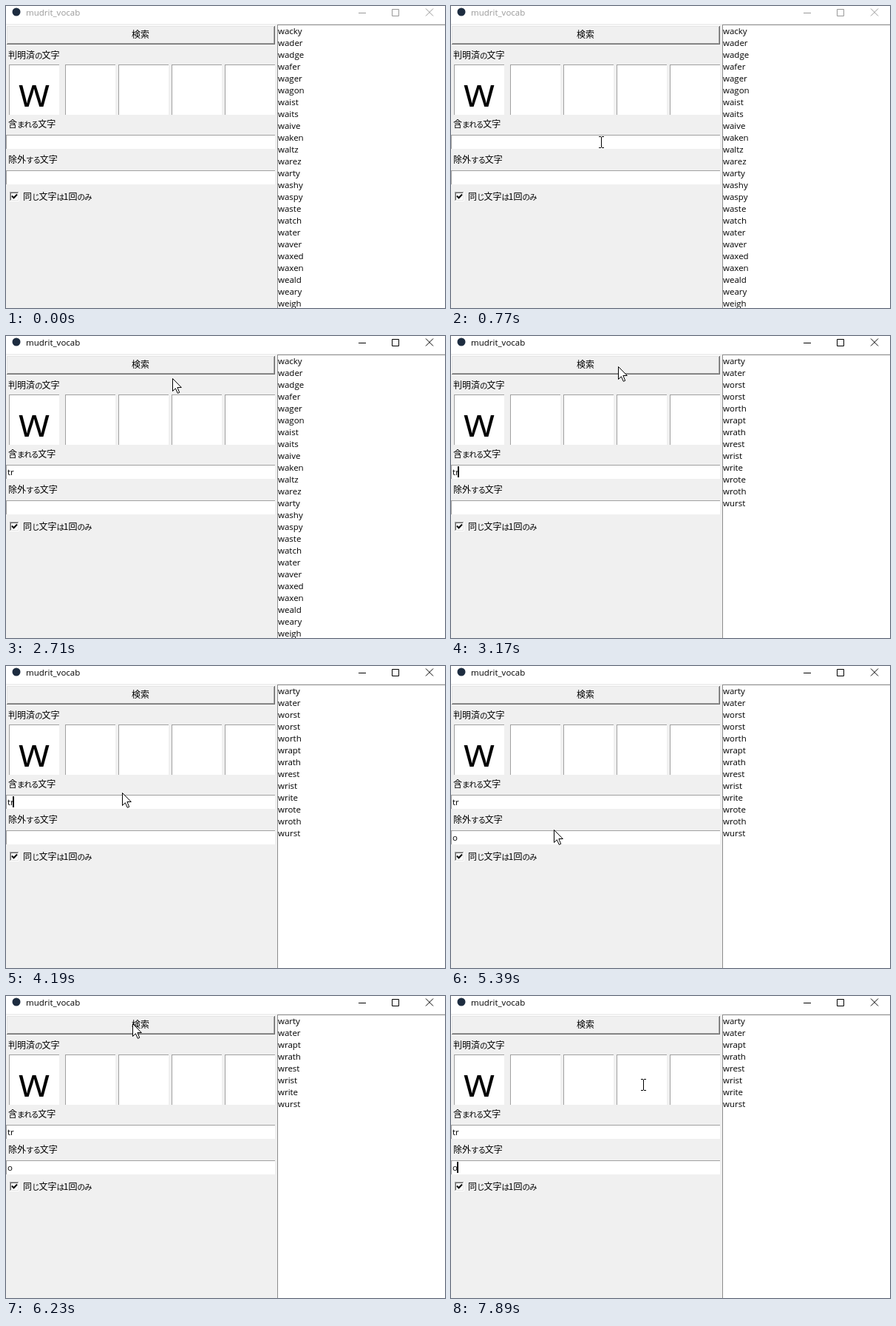
Animation of 594x408 px, one loop 7990 ms. Source, as an HTML page:

```html
<!DOCTYPE html>
<html lang="ja">
<head>
<meta charset="utf-8">
<style>
html, body { margin: 0; width: 100%; height: 100%; overflow: hidden; background: #f0f0f0; }
svg { display: block; }
rect { shape-rendering: crispEdges; }
text { font: 11.5px "Open Sans", "Noto Sans", sans-serif; }
.ja { font: 12px "Noto Sans CJK JP", "Noto Sans CJK", sans-serif; }
.kana { font-size: 10.6px; letter-spacing: -1.2px; }
</style>
</head>
<body>
<svg id="stage" width="594" height="408" viewBox="0 0 594 408"></svg>
<script>
const LOOP = 7990;
const stage = document.getElementById('stage');

function add(tag, attrs, text = '', parent = stage) {
  const el = document.createElementNS('http://www.w3.org/2000/svg', tag);
  for (const k in attrs) el.setAttribute(k, attrs[k]);
  el.textContent = text;
  return parent.appendChild(el);
}
const box = (x, y, width, height, fill) => add('rect', { x, y, width, height, fill });
const label = (x, y, text) => add('text', { x, y }, text);
const show = (el, on) => el.setAttribute('visibility', on ? 'visible' : 'hidden');

// Japanese text with narrower kana
function japanese(x, y, text) {
  const el = add('text', { x, y, class: 'ja' });
  for (const part of text.match(/[ぁ-ん]+|[^ぁ-ん]+/g))
    add('tspan', /[ぁ-ん]/.test(part) ? { class: 'kana' } : {}, part, el);
  return el;
}

function field(x, y, w, h) {
  box(x, y, w, h, '#a0a0a0');
  box(x + 1, y + 1, w - 1, h - 1, '#fff');
}

// Title bar
box(0, 0, 594, 24, '#fff');
add('circle', { cx: 14, cy: 8, r: 5.5, fill: '#1d2c40' });
const title = label(27, 13, 'mudrit_vocab');
const controls = add('path', { d: 'M477 9.5h10M522.5 4.5h9v9h-9zM568 3.5l10 10M578 3.5l-10 10', fill: 'none' });

// Search button
const edges = ['#fff', '#696969', '#e3e3e3', '#a0a0a0', '#f0f0f0'];
const bevel = [
  box(0, 26, 364, 26), box(1, 27, 363, 25), box(1, 27, 362, 24),
  box(2, 28, 361, 23), box(2, 28, 360, 22)
];
const search = japanese(170, 43, '検索');

// Left panel
japanese(3, 71, '判明済の文字');
for (let i = 0; i < 5; i++) field(i ? 8 + 72 * i : 4, 79, 68, 68);
add('text', { x: 38, y: 136, 'text-anchor': 'middle', style: 'font-size:54px' }, 'w');
japanese(3, 164, '含まれる文字');
field(0, 174, 364, 19);
japanese(3, 212, '除外する文字');
field(0, 222, 364, 19);
box(5, 251, 13, 13, '#fff');
box(5, 251, 12, 12, '#a0a0a0');
box(6, 252, 11, 11, '#e3e3e3');
box(6, 252, 10, 10, '#696969');
box(7, 253, 9, 9, '#fff');
add('path', { d: 'M8 256.5l2.5 2.8 4.5-4.8', fill: 'none', stroke: '#000', 'stroke-width': 2 });
japanese(23, 262, '同じ文字は1回のみ');
const included = label(2, 188, '');
const excluded = label(2, 236, '');
const caret = box(1, 176, 2, 15, '#000');

// Result list
box(367, 25, 227, 383, '#8c8c8c');
box(368, 26, 226, 382, '#fff');
const all = ('wacky wader wadge wafer wager wagon waist waits waive waken waltz warez ' +
  'warty washy waspy waste watch water waver waxed waxen weald weary weigh').split(' ');
const withTr = 'warty water worst worst worth wrapt wrath wrest wrist write wrote wroth wurst'.split(' ');
const withoutO = withTr.filter(w => !w.includes('o'));
const rows = all.map((w, i) => label(368, 38 + 16 * i, w));

// Pointer
const arrow = add('path', {
  d: 'M.5 .5V17.5L4.4 13.8 7.3 20.3 9.7 19.3 6.9 12.5H12.3Z', fill: '#fff', stroke: '#000'
});
const beam = add('path', { d: 'M-3-7.5h3m1 0h3M.5-7v14M-3 7.5h3m1 0h3', fill: 'none', stroke: '#000' });
const path = [
  [0, 123, 500], [209, 123, 500], [210, 123, 400], [560, 212, 222], [770, 203, 184],
  [1740, 203, 184], [1790, 205, 184], [2530, 205, 184], [2710, 225, 57], [2940, 226, 41],
  [3600, 226, 41], [3630, 225, 41], [4040, 225, 41], [4190, 157, 171], [4650, 136, 230],
  [5210, 136, 230], [5390, 139, 221], [5950, 171, 37], [7380, 171, 37], [7890, 260, 120]
];

function pointerAt(t) {
  let i = path.length - 1;
  while (path[i][0] > t) i--;
  const [t0, x0, y0] = path[i];
  const [t1, x1, y1] = path[i + 1] || [LOOP, x0, y0];
  const p = Math.floor((t - t0) / 46) * 46 / (t1 - t0);
  const e = Math.sin(p * Math.PI / 2);
  return [Math.round(x0 + (x1 - x0) * e), Math.round(y0 + (y1 - y0) * e)];
}

function overField(x, y) {
  if (x > 364) return false;
  if (y >= 79 && y < 147) return x >= 4 && (x - 8) % 72 < 68;
  return (y >= 174 && y < 193) || (y >= 222 && y < 241);
}

function draw(t) {
  const active = t >= 1130;
  title.setAttribute('fill', active ? '#000' : '#999');
  controls.setAttribute('stroke', active ? '#000' : '#999');

  const pressed = (t >= 2990 && t < 3170) || (t >= 6000 && t < 6230);
  const order = pressed ? [1, 0, 3, 2, 4] : [0, 1, 2, 3, 4];
  bevel.forEach((el, i) => el.setAttribute('fill', edges[order[i]]));
  search.setAttribute('transform', pressed ? 'translate(1 1)' : '');

  included.textContent = t < 1420 ? '' : t < 2380 ? 't' : 'tr';
  excluded.textContent = t < 5210 ? '' : 'o';
  const second = t >= 4700;
  const typed = second ? [1, 8][excluded.textContent.length] : [1, 5, 9][included.textContent.length];
  caret.setAttribute('x', typed);
  caret.setAttribute('y', second ? 224 : 176);
  const since = Math.max(0, t - (second ? 4730 : 1130));
  show(caret, active && since % 900 < 600);

  const words = t < 3170 ? all : t < 6230 ? withTr : withoutO;
  rows.forEach((row, i) => row.textContent = words[i] || '');

  const [x, y] = pointerAt(t);
  const text = overField(x, y);
  show(arrow, !text);
  show(beam, text);
  (text ? beam : arrow).setAttribute('transform', `translate(${x} ${y})`);
}

let start;
function tick(now) {
  start ??= now;
  draw((now - start) % LOOP);
  requestAnimationFrame(tick);
}
draw(0);
requestAnimationFrame(tick);
</script>
</body>
</html>
```
